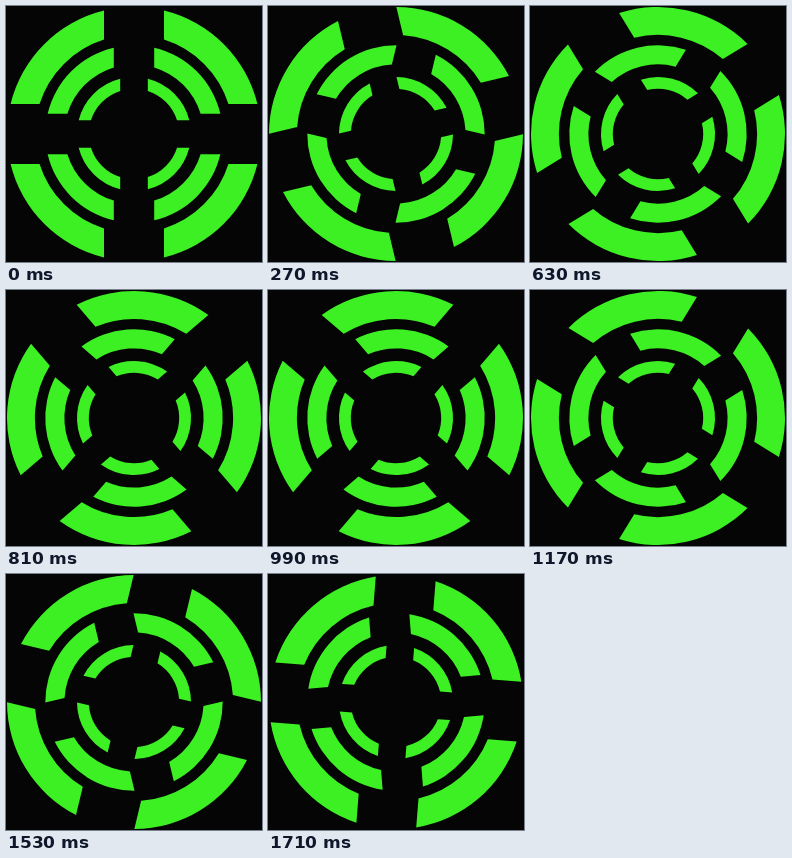
An HTML page for the animation above (1.8 s loop, 256x256 px).

```html
<!DOCTYPE html>
<html lang="en">
<head>
<meta charset="utf-8">
<title>Counter-rotating rings</title>
<style>
  html, body { margin: 0; width: 100%; height: 100%; overflow: hidden; background: #050505; }
  svg { display: block; width: 100vw; height: 100vh; }
</style>
</head>
<body>
<svg viewBox="0 0 256 256">
  <rect width="256" height="256" fill="#050505"/>
  <g id="rings" transform="translate(128 128)" fill="#3cf024"></g>
</svg>
<script>
const NS = 'http://www.w3.org/2000/svg';
const LOOP = 1800, STEP = 90, TURN = 90;

// outer radius, inner radius, half width of the gap, direction
const rings = [
  { outer: 127, inner: 99.1, gap: 30, dir: -1 },
  { outer: 88.7, inner: 69.6, gap: 20.2, dir: 1 },
  { outer: 57, inner: 45.2, gap: 13.8, dir: -1 }
];

function add(parent, tag, attrs = {}) {
  const el = document.createElementNS(NS, tag);
  for (const key in attrs) el.setAttribute(key, attrs[key]);
  return parent.appendChild(el);
}

// One quarter of a ring, its ends cut parallel to the axes
function quarter({ outer, inner, gap }) {
  const far = Math.sqrt(outer * outer - gap * gap);
  const near = Math.sqrt(inner * inner - gap * gap);
  return `M${gap} ${-far}A${outer} ${outer} 0 0 1 ${far} ${-gap}` +
    `H${near}A${inner} ${inner} 0 0 0 ${gap} ${-near}Z`;
}

const root = document.getElementById('rings');
for (const ring of rings) {
  ring.el = add(root, 'g');
  for (let i = 0; i < 4; i++) {
    add(ring.el, 'path', { d: quarter(ring), transform: `rotate(${i * 90})` });
  }
}

function draw(ms) {
  const held = Math.floor((ms % LOOP) / STEP) * STEP;
  const angle = held / LOOP * TURN;
  for (const { el, dir } of rings) el.setAttribute('transform', `rotate(${dir * angle})`);
}

const start = performance.now();
function tick() {
  draw(performance.now() - start);
  requestAnimationFrame(tick);
}
draw(0);
requestAnimationFrame(tick);
</script>
</body>
</html>
```
